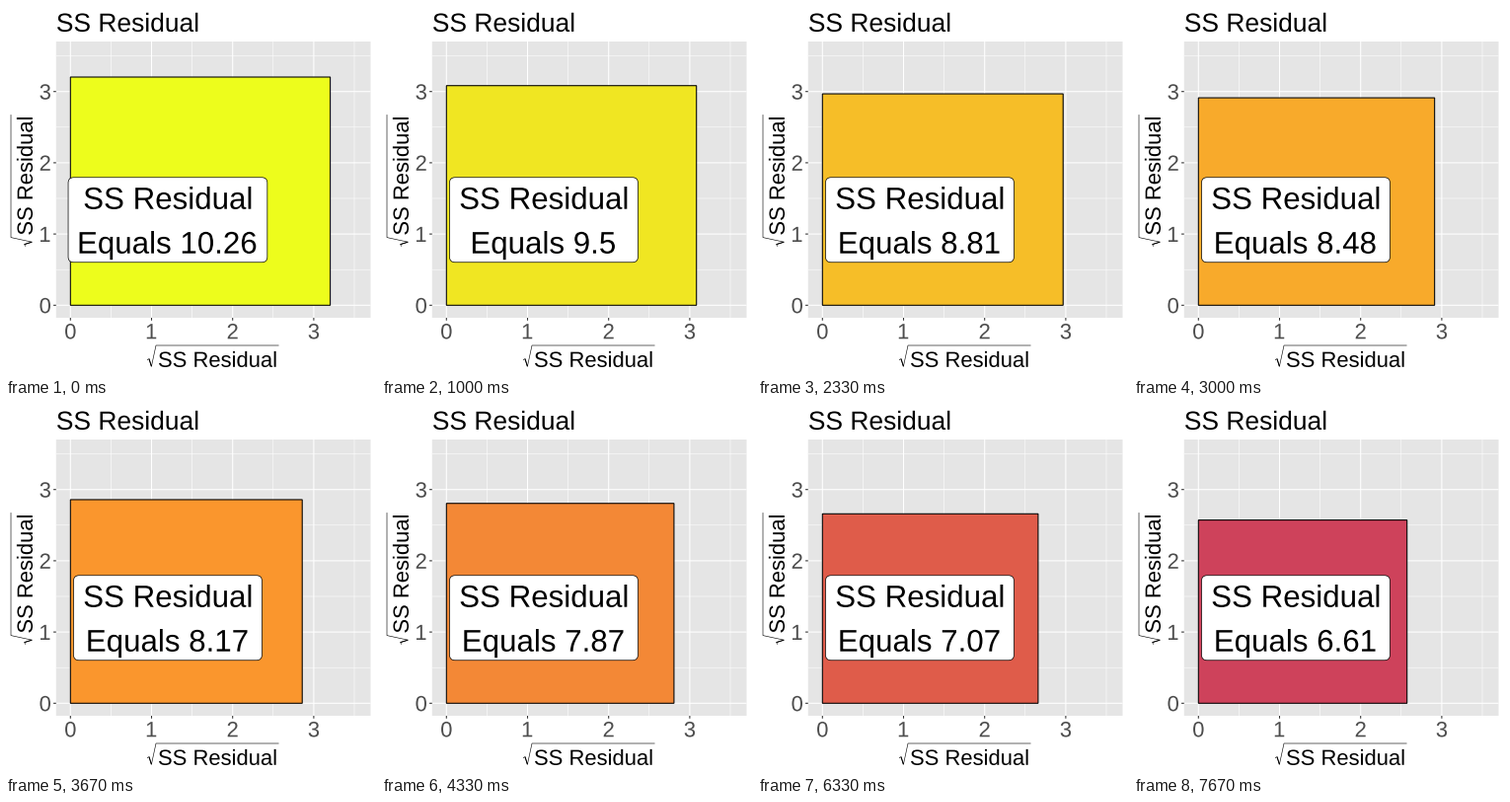
These frames come from a looping animation (375 px wide and 375 px high, 8 s). A matplotlib script:

```python
import numpy as np
import matplotlib.pyplot as plt
from matplotlib.animation import FuncAnimation
from matplotlib.patches import FancyBboxPatch, PathPatch, Rectangle
from matplotlib.textpath import TextPath
from matplotlib.transforms import Affine2D

SIZE, DPI = 375, 72          # at 72 dpi one point is one pixel
LOOP, STEP = 8000, 20
LEFT, RIGHT, TOP, BOTTOM = 50.8, 369.5, 36, 316
FONT = {"family": "Liberation Sans"}

# Fill colours at every second state, blended in between
FILLS = ["#EDFD1C", "#F0E622", "#F6BE28", "#FA962D", "#ED7A3F", "#DF5C4A", "#CE425B"]
FILL_RGB = np.array([[int(c[i:i + 2], 16) / 255 for i in (1, 3, 5)] for c in FILLS])


def px(v):
    return 65.3 + 82.2 * v


def py(v):
    return 303.3 - 72.2 * v


def line(xs, ys, color, width):
    ax.plot(xs, ys, color=color, lw=width, zorder=1, solid_capstyle="butt",
            solid_joinstyle="miter", snap=False)


def place(x, y, angle=0):
    """Map baseline coordinates (along, up) onto the stage, where y runs down."""
    return Affine2D().rotate_deg(angle).scale(1, -1).translate(x, y)


def outline(x, y, s, size, centered=False):
    path = TextPath((0, 0), s, size=size, prop=FONT)
    if centered:
        box = path.get_extents()
        x -= (box.x0 + box.x1) / 2
    return place(x, y).transform_path(path)


def text(x, y, s, size, color="black", centered=False, z=1):
    patch = PathPatch(outline(x, y, s, size, centered), fc=color, lw=0,
                      zorder=z, snap=False)
    return ax.add_patch(patch)


def grid(values, width):
    for v in values:
        line([px(v)] * 2, [TOP, BOTTOM], "white", width)
        line([LEFT, RIGHT], [py(v)] * 2, "white", width)


def root_title(x, y, angle):
    """Axis title under a square root sign."""
    frame = place(x, y, angle)
    words = TextPath((0, 0), "SS Residual", size=22, prop=FONT)
    ax.add_patch(PathPatch(frame.transform_path(words), fc="black", lw=0, snap=False))
    root = frame.transform([[-11, 7], [-9, 8.2], [-6.6, 0.5], [-2, 21.8], [122.5, 21.8]])
    line(*root.T, "black", 0.6)
    line(*root[1:3].T, "black", 1.0)


fig = plt.figure(figsize=(SIZE / DPI, SIZE / DPI), dpi=DPI, facecolor="white")
ax = fig.add_axes([0, 0, 1, 1])
ax.set(xlim=(0, SIZE), ylim=(SIZE, 0), autoscale_on=False)
ax.axis("off")

ax.add_patch(Rectangle((LEFT, TOP), RIGHT - LEFT, BOTTOM - TOP, fc="#E5E5E5",
                       lw=0, zorder=0, snap=False))
grid([0.5, 1.5, 2.5, 3.5], 0.55)
grid([0, 1, 2, 3], 1.07)
for v in range(4):
    line([px(v)] * 2, [BOTTOM, BOTTOM + 2.75], "#333333", 1.07)
    line([LEFT - 2.75, LEFT], [py(v)] * 2, "#333333", 1.07)
    text(px(v), 337.3, str(v), 22, "#4D4D4D", centered=True)
    text(39.7, py(v) + 7.9, str(v), 22, "#4D4D4D", centered=True)

text(LEFT, 25.9, "SS Residual", 26.4)
root_title(154, 365.8, 0)
root_title(26.8, 232.6, 90)

MID_X, MID_Y = px(1.2), py(1.2)
square = Rectangle((px(0), py(0)), 1, 1, ec="black", lw=1.07, zorder=3,
                   joinstyle="miter", snap=False)
label = FancyBboxPatch((69, 174), 191, 86, boxstyle="round,pad=0,rounding_size=5.6",
                       fc="white", ec="black", lw=0.71, zorder=4, snap=False)
ax.add_patch(square)
ax.add_patch(label)
text(MID_X, 205.7, "SS Residual", 31.3, centered=True, z=5)
equals = text(MID_X, 250.7, "Equals", 31.3, centered=True, z=5)


def update(i):
    time = i * STEP + STEP / 2
    state = int((time + 1010 / 3) // (2000 / 3))
    residual = 10.262 - 0.394 * state + 0.0075 * state ** 2
    side = residual ** 0.5
    square.set_bounds(px(0), py(side), px(side) - px(0), py(0) - py(side))
    square.set_facecolor([np.interp(state / 2, range(7), ch) for ch in FILL_RGB.T])
    half = 100.9 if residual >= 10 else 95.5
    label.set_bounds(MID_X - half, MID_Y - 42.9, 2 * half, 86)
    equals.set_path(outline(MID_X, 250.7, f"Equals {round(residual, 2):g}", 31.3, True))
    return square, label, equals


anim = FuncAnimation(fig, update, frames=LOOP // STEP, interval=STEP,
                     repeat=True, repeat_delay=0, blit=False)
plt.show()
```
